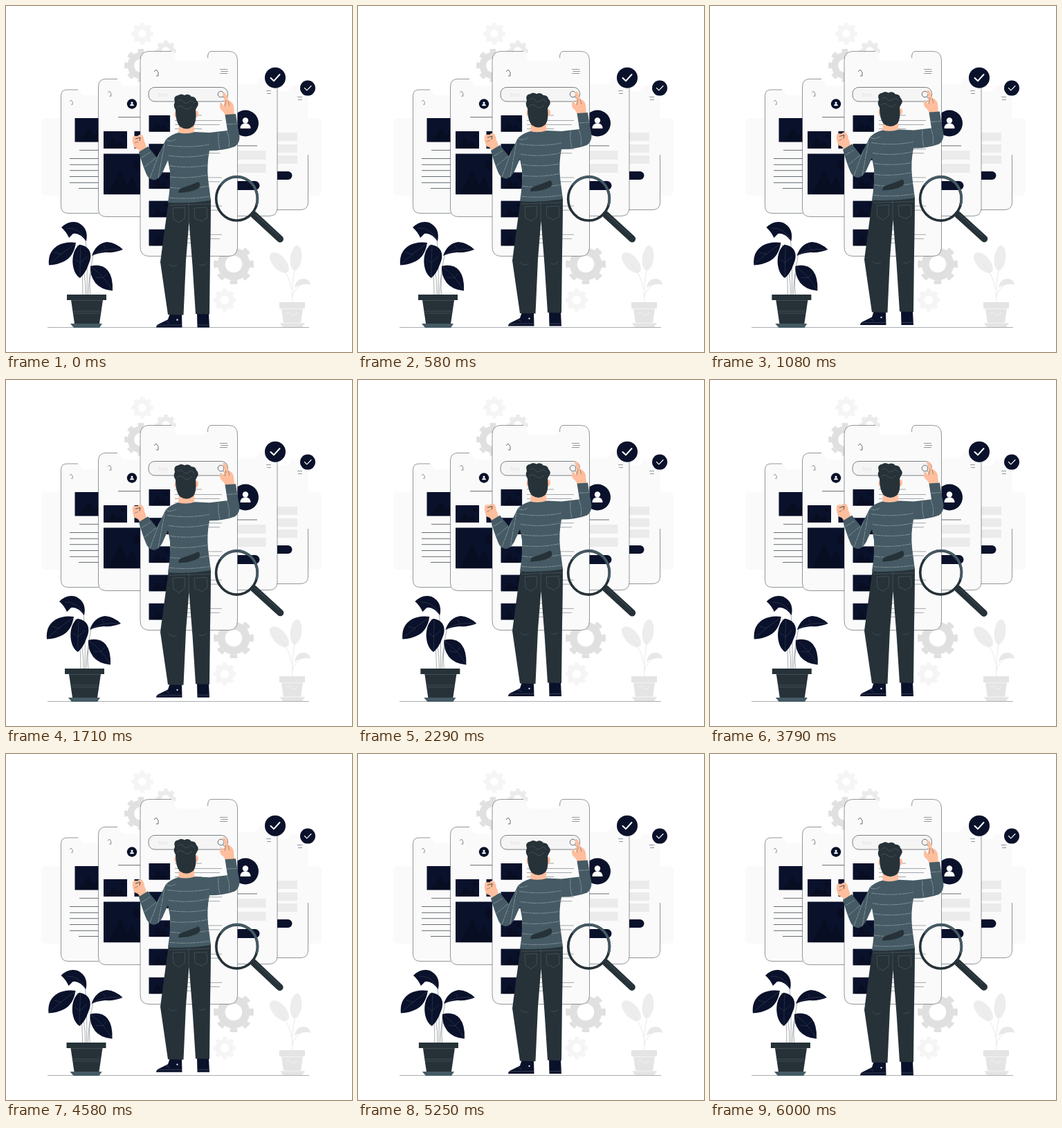
Recreate the animation shown at these times as an HTML page. Size 500x500 px, loop 6.04 s.

```html
<!DOCTYPE html>
<html lang="en">
<head>
<meta charset="utf-8">
<title>Phone search</title>
<style>
html, body { margin: 0; width: 100%; height: 100%; overflow: hidden; background: #fff; }
svg { display: block; width: 100%; height: 100%; }
.line { fill: none; stroke: #263238; stroke-width: .7; }
.phone { fill: #fafafa; }
.edge { fill: none; stroke: #263238; stroke-width: .5; }
.navy { fill: #0a112b; }
.dark { fill: #263238; }
.slate { fill: #455a64; }
.skin { fill: #ffbe9d; }
.bar { fill: #ebebeb; }
.vein { fill: none; stroke: #50586c; stroke-width: .4; }
.stripe { fill: none; stroke: #a3b0b6; stroke-width: .6; stroke-dasharray: 9 1 4 .6; }
.seam { fill: none; stroke: #52616a; stroke-width: .6; }
.tick { fill: none; stroke: #fff; stroke-linecap: round; stroke-linejoin: round; }
text { font: 7.5px Roboto, sans-serif; fill: #e0e0e0; }
</style>
</head>
<body>
<svg viewBox="0 0 500 500">
  <defs>
    <g id="thumb">
      <rect class="navy" width="34" height="25"/>
      <path d="M4 25L14 10L20 19L24 14L32 25Z" fill="#000" opacity=".2"/>
      <circle cx="28" cy="7" r="3" fill="#000" opacity=".2"/>
    </g>
    <g id="user">
      <circle class="navy" r="19"/>
      <circle cy="-4" r="4.2" fill="#fff"/>
      <path d="M-7.500 7.500Q-7.500 0 0 0T7.500 7.500Z" fill="#fff"/>
    </g>
    <path id="menu" class="edge" d="M0 0H11M1.500 3H12M0 6H11"/>
    <path id="home" class="line" d="M0 3L3 0L6 4V9H3"/>
  </defs>

  <rect x="51" y="162" width="50" height="112" rx="6" fill="#fafafa"/>
  <rect x="406" y="162" width="50" height="112" rx="6" fill="#fafafa"/>
  <g id="gears"></g>
  <path d="M60 464.500H438" stroke="#263238" stroke-width=".4"/>

  <!-- outer phones -->
  <path class="phone" d="M79.500 130Q79.500 121 88 121H104Q108 121 108.500 125T114 129H200V299.500H90Q79.500 299.500 79.500 289Z"/>
  <path class="edge" d="M104 121H88Q79.500 121 79.500 130V289Q79.500 299.500 90 299.500H134"/>
  <use href="#home" transform="translate(92 136) scale(.7)"/>
  <use href="#thumb" transform="translate(99.500 162) scale(1.4 1.38)"/>
  <path class="line" d="M106 208.400H134M92 220.500H134M92 229.300H134M92 237.700H134M92 246.500H134M92 255.300H134M105 263.500H134"/>
  <path class="phone" d="M436.500 126Q436.500 115.500 427 115.500H414Q410 116 409.500 120T404 123H340V295H426Q436.500 294 436.500 284Z"/>
  <path class="edge" d="M436.500 215V284Q436.500 294 426 294.500H392"/>
  <path class="edge" d="M421 131.500H428M422 135.500H428"/>
  <path class="bar" d="M380 183H421V195H380ZM380 200H421V212H380ZM380 216H421V228H380Z"/>
  <rect class="navy" x="370" y="239" width="43.500" height="12" rx="6"/>

  <!-- inner phones -->
  <path class="phone" d="M133.500 117Q133.500 105.500 144 105.500H161Q165 106 165.500 110T171 115H220V305H145Q133.500 304 133.500 293Z"/>
  <path class="edge" d="M161 105.500H144Q133.500 105.500 133.500 117V293Q133.500 304.500 145 304.500H194"/>
  <use href="#home" transform="translate(147 123) scale(.8)"/>
  <use href="#user" transform="translate(182 141.500) scale(.38)"/>
  <path class="line" d="M162 160.700H195"/>
  <use href="#thumb" x="141" y="181"/>
  <use href="#thumb" x="185.500" y="181"/>
  <use href="#thumb" transform="translate(141 213.500) scale(1.7 2.35)"/>
  <path class="phone" d="M392 115Q392 104 382 104H369Q365 104 364.500 108T359 113H310V303.500H381Q392 303 392 292Z"/>
  <path class="edge" d="M392 115V292Q392 303 381 303.500H334"/>
  <path class="edge" d="M376 122.500H383M377 126.500H383"/>
  <use href="#user" x="346" y="169.500"/>
  <path class="line" d="M334 202H363"/>
  <path class="bar" d="M330 209H375.500V222H330ZM330 228H375.500V241H330Z"/>
  <rect class="navy" x="320" y="253" width="46.500" height="13" rx="6.500"/>

  <!-- main phone -->
  <path class="phone" d="M194 79Q194 65.500 207 65.500H239Q243 66 243 72Q243.500 79 249 79H285Q291 79 291 72Q291 65.500 296 65.500H322Q334.500 65.500 334.500 79V348Q334.500 361.500 322 361.500H207Q194 361.500 194 348Z"/>
  <path class="edge" d="M239 65.500H207Q194 65.500 194 79V348Q194 361.500 207 361.500H322Q334.500 361.500 334.500 348V79Q334.500 65.500 322 65.500H296Q291.500 66 291.500 75"/>
  <use href="#home" x="214" y="92"/>
  <use href="#menu" x="309" y="91.500"/>
  <rect x="206" y="117.500" width="114.500" height="20.500" rx="9" fill="#f5f5f5" stroke="#263238" stroke-width=".6"/>
  <text x="219.500" y="131">Text</text>
  <path class="line" d="M313.500 131L317 135"/>
  <circle class="line" cx="310.500" cy="127.500" r="4.300"/>
  <g id="rows"></g>

  <!-- badges -->
  <circle class="navy" cx="389" cy="103.700" r="15"/>
  <path class="tick" d="M382.500 104L387 108.300L395.500 99" stroke-width="2"/>
  <circle class="navy" cx="436" cy="118.600" r="11"/>
  <path class="tick" d="M431.500 118.500L434.800 121.800L441 115.500" stroke-width="1.100"/>

  <!-- pale plant -->
  <g fill="#ededed">
    <ellipse cx="395" cy="371" rx="9.500" ry="18" transform="rotate(-42 395 371)"/>
    <ellipse cx="419" cy="364" rx="8.300" ry="18" transform="rotate(7 419 364)"/>
    <path d="M417 407Q419 394 431 394Q439 395 440 403Q430 400 417 407Z" fill="#e8e8e8"/>
    <path d="M414 428Q412 410 418 375M413 410Q411 392 394 372M414 420Q415 409 432 399" fill="none" stroke="#e4e4e4" stroke-width=".8"/>
  </g>
  <path d="M395 428H432V437H395ZM398 437H429L426 458H401ZM396 458H432L428 464H400Z" fill="#e4e4e4"/>
  <path d="M398 437.500H429M405 444Q409 441 412 445T421 443M396 458H432" fill="none" stroke="#f6f6f6" stroke-width=".8"/>

  <g id="plant">
    <path d="M111 418Q111 390 108 372M115 418Q116 385 103 345M119 418Q119 395 126 360M122 418Q119 395 125 378M117 418Q118 370 115 338" fill="none" stroke="#263238" stroke-width=".4"/>
    <g class="navy">
      <path d="M80 320Q91 309 104 313Q120 321 116 340Q106 327 97 329L91 335Q87 326 80 320Z"/>
      <path d="M62 374.500Q60 355 75 346Q86 340 101 342Q98 362 84 369Q74 374 62 374.500Z"/>
      <path d="M107 393C94 386 92 355 106 345C120 346 127 358 119 374Q115 386 107 393Z"/>
      <path d="M124 361Q130 343 146 341Q159 342 169 352Q157 357 144 356Q132 357 124 361Z"/>
      <path d="M122 376Q138 372 147 382Q155 392 154 411.500Q137 410 129 400Q121 389 122 376Z"/>
    </g>
    <path class="vein" d="M88 321Q106 320 115 338M64 372Q80 357 101 343M107 391Q107 365 108 347M125 360Q142 349 167 352M123 377Q142 390 153 410M70 356L81 359M100 366L107 371L117 362M141 346L144 351M130 392L140 393L146 386"/>
    <path class="dark" d="M88 417H145V425H88ZM94 425H140L135 459H99Z"/>
    <path class="slate" d="M93 459H139L135 465H98Z"/>
    <path class="seam" d="M94 425.500H140M97 441H136M98 444H136"/>
  </g>

  <g id="man">
    <path class="navy" d="M237 444H254L254.500 464.500H217Q217 460.500 223 458.500L234 453ZM276 444H293L294 464.500H276.500Z"/>
    <path class="seam" d="M219 461.500L236 461H254M277 461H294M231 455L236 458"/>
    <circle cx="247.500" cy="453.500" r="1.200" fill="#e0e0e0"/>

    <path class="dark" d="M235 281L296 279Q296 315 295 360L294 445.500L274 445L269.500 375L264.500 312L260 368L256.500 446.500L234 446L223 370L229 325Z"/>
    <path class="seam" d="M241 292L259 291L258 307L250 313L242 308ZM272 292L290 291L291 306L283 311L273 307ZM264 285V312M235 372Q240 379 247 374M279 374Q285 377 290 371M236 288L296 286"/>

    <!-- hands -->
    <path class="skin" d="M183 190Q184 187 190 188Q194 184 197 187Q200 191 200 196Q203 200 202 206L193 211Q192 206 186 205Q182 198 183 190Z"/>
    <path class="skin" d="M313 127Q314 124.500 317 126Q320 130 321 136Q328 139 329 145L330 157L317 158Q315 153 310 149Q308 144 310 139Q313 141 315 145L316 136Z"/>
    <path d="M187 192L194 190L193 195" fill="none" stroke="#263238" stroke-width=".8"/>
    <path d="M186 198L191 196M318 136L316 145M321 137L323 144" fill="none" stroke="#263238" stroke-width=".4"/>

    <path class="skin" d="M250 170H272V185Q261 190 249 185Z"/>
    <path class="slate" d="M249 183Q261 186 273 182L294 183L320 180L316.500 157L332 156Q334 172 337.500 188Q338 198 331 203Q315 209 294 209Q290 228 292 250L296 281Q265 286 234 284Q238 260 237 239L234 223L226 241Q220 252 213 251.500Q205 250 202 241Q197 229 192 211L205 203L218 219Q223 209 231 193Q238 186 249 183Z"/>
    <path class="stripe" d="M233 201Q262 206 294 200M235 216Q264 221 293 214M237 231Q264 235 291 230M238 247Q264 250 292 244M237 262Q264 266 293 260M236 277Q265 280 295 275M231 193Q237 198 246 192M307 183Q306 195 309 207M319 181Q324 191 322 205M319 171L335 170M196 219L209 211M200 233L217 219M208 249L222 211M220 249L229 199"/>
    <path class="dark" d="M249 270Q249 263 257 262Q269 258 278 254Q282 257 279 263Q267 270 249 270Z"/>
    <path class="seam" d="M239 249Q252 255 278 248M294 184Q294 201 291 214"/>

    <!-- head -->
    <ellipse class="skin" cx="246.500" cy="157" rx="3" ry="5"/>
    <ellipse class="skin" cx="275" cy="156" rx="3" ry="5"/>
    <path class="dark" d="M245 150Q241 144 244 139Q241 130 249 129Q253 126 258 129Q264 126 268 131Q274 131 275 136Q280 141 276 146L274 150Q276 168 270 174Q261 181 251 174Q245 167 245 150Z"/>
    <path class="seam" d="M248 138Q253 133 256 138T265 138Q270 135 272 141M247 147Q252 142 257 147T269 145"/>
  </g>

  <g id="lens" fill="none">
    <path d="M358 301.500L396 336.700" stroke="#263238" stroke-width="10" stroke-linecap="round"/>
    <path d="M360 301L394 332" stroke="#455a64" stroke-width=".7"/>
    <ellipse cx="333.500" cy="278.500" rx="29.800" ry="31.500" stroke="#263238" stroke-width="3.600"/>
    <path d="M310 259A29.800 31.500 0 0 1 362 288" stroke="#455a64" stroke-width="3.600"/>
  </g>
</svg>
<script>
const LOOP = 6040;
const el = id => document.getElementById(id);

function gear(x, y, r, hole, color) {
  const tooth = r * .2, body = r - tooth;
  return `<g transform="translate(${x} ${y}) rotate(-11.25)" fill="none" stroke="${color}">
    <circle r="${(body + hole) / 2}" stroke-width="${body - hole + .4}"/>
    <circle r="${r - tooth / 2}" stroke-width="${tooth}" pathLength="16" stroke-dasharray="1"/></g>`;
}

el('gears').innerHTML =
  gear(197, 40, 16, 6, '#f5f5f5') + gear(231, 65, 15, 6, '#ebebeb') +
  gear(195, 86, 24, 10, '#e0e0e0') + gear(329, 373, 29, 12.5, '#e0e0e0') +
  gear(316, 425, 16.5, 6.5, '#f5f5f5');

el('rows').innerHTML = [0, 1, 2, 3, 4].map(i => {
  const y = 158 + i * 41.2;
  return `<use href="#thumb" transform="translate(206.500 ${y}) scale(.9 .95)"/>
    <path class="line" opacity=".6" d="M244 ${y}H283M244 ${y + 7.5}H312M244 ${y + 13.5}H309M244 ${y + 19.5}H283"/>`;
}).join('');

// Linear interpolation through evenly spaced keys over one loop
function track(keys, p) {
  const k = p * (keys.length - 1), i = Math.floor(k);
  return keys[i] + (keys[i + 1] - keys[i]) * (k - i);
}

const FLOAT = [0, -10, 0];
const SHAKE = [0, -1, 2, -4, 4, -4, 4, -4, 2, -1, 0];
const SWAY = [0, -.5, 0, .5, 0];

function draw(now) {
  const p = now % LOOP / LOOP;
  el('man').setAttribute('transform', `translate(0 ${track(FLOAT, p)})`);
  el('plant').setAttribute('transform', `translate(${track(SHAKE, p)} 0)`);
  el('lens').setAttribute('transform', `rotate(${track(SWAY, p)} 352 293)`);
}

const start = performance.now();
function tick() {
  draw(performance.now() - start);
  requestAnimationFrame(tick);
}
tick();
</script>
</body>
</html>
```
